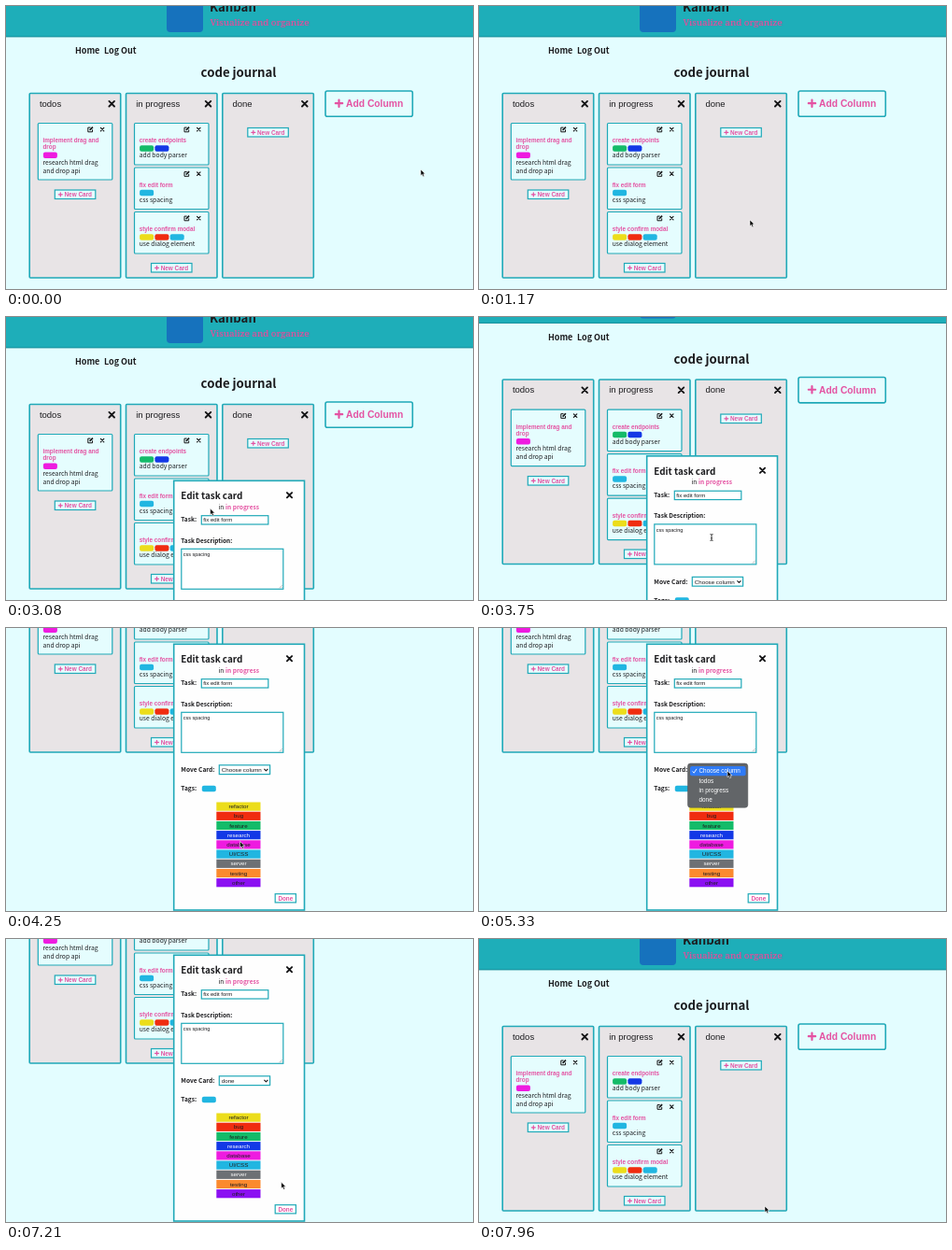
Recreate the animation shown at these times as an HTML page. Size 500 px wide and 303 px high, loop 8 s.

```html
<!DOCTYPE html>
<html lang="en">
<head>
<meta charset="utf-8">
<title>Kanban board</title>
<style>
  html, body { margin: 0; width: 100%; height: 100%; overflow: hidden; background: #e3fdff; }
  svg { display: block; width: 500px; height: 303px; }
  text { fill: #1c1c1f; white-space: pre; }
  .sans { font-family: "Noto Sans CJK JP", "Noto Sans CJK SC", "Noto Sans CJK", "Noto Sans", sans-serif; }
  .arial { font-family: "Liberation Sans", Arial, sans-serif; }
  .serif { font-family: "Noto Serif", serif; }
  .b { font-weight: 700; }
  .pink { fill: #e452a2; }
  .white { fill: #fff; }
  .mid { text-anchor: middle; }
</style>
</head>
<body>
<svg id="stage" viewBox="0 0 500 303" xmlns="http://www.w3.org/2000/svg"></svg>
<script>
const LOOP = 8000, MAX_SCROLL = 158;
const OPEN = 2700, POPUP = 4800, PICK = 6640, CLOSE = 7700;
const TEAL = '#20a9b8', ICE = '#e5fdfe', INK = '#141416', PINK = '#e452a2';
const TAG = {
  yellow: '#ecdd1b', red: '#f02c10', green: '#14bb69', blue: '#1338e6', magenta: '#ee1be0',
  cyan: '#21b6e1', gray: '#6d7074', orange: '#fb8a2e', purple: '#8b10f2'
};

// Drawing helpers
const text = (x, y, size, cls, str) =>
  `<text x="${x}" y="${y}" font-size="${size}" class="${cls}">${str}</text>`;
const rect = (x, y, w, h, fill, stroke = 'none', sw = 1, r = 0) =>
  `<rect x="${x}" y="${y}" width="${w}" height="${h}" rx="${r}" fill="${fill}" stroke="${stroke}" stroke-width="${sw}"/>`;
const line = (d, color, w, cap = 'butt') =>
  `<path d="${d}" fill="none" stroke="${color}" stroke-width="${w}" stroke-linecap="${cap}" stroke-linejoin="round"/>`;
const cross = (x, y, r, w) =>
  line(`M${x - r} ${y - r}l${2 * r} ${2 * r}M${x + r} ${y - r}l${-2 * r} ${2 * r}`, INK, w, 'round');
const plus = (x, y, r, w) =>
  line(`M${x - r} ${y}h${2 * r}M${x} ${y - r}v${2 * r}`, PINK, w, 'round');
const pill = (x, y, color) => rect(x, y, 15, 6.5, TAG[color], 'none', 0, 2);
const group = (id, body, attrs = '') => `<g id="${id}" ${attrs}>${body}</g>`;

const editIcon = (x, y) =>
  line(`M${x + .2} ${y - 2}h-2.7v4.7h4.7v-2.4`, INK, 1) +
  line(`M${x - .7} ${y + .9}L${x + 2.6} ${y - 2.4}`, INK, 1.7);

function newCard(x, y) {
  return rect(x, y, 43.5, 9.5, ICE, TEAL, 1.2) + plus(x + 6, y + 4.8, 2, 1.2) +
    text(x + 10.2, y + 7, 6.4, 'arial b pink', 'New Card');
}

function column(x, title) {
  return rect(x, 93.5, 97.5, 197.5, '#e8e4e6', TEAL, 1.6, 1) +
    text(x + 10.7, 107.5, 9.5, 'arial', title) + cross(x + 88, 104.7, 2.8, 1.9);
}

function card(x, y, h, title, tags, body) {
  let out = rect(x, y, 79.5, h, ICE, TEAL, 1.2, 1) +
    editIcon(x + 56, y + 6.6) + cross(x + 68.8, y + 6.6, 1.7, 1.2);
  title.forEach((s, i) => out += text(x + 5.2, y + 20.6 + i * 7.3, 6.3, 'arial b pink', s));
  const top = y + 23.7 + (title.length - 1) * 7.3;
  tags.forEach((c, i) => out += pill(x + 5.6 + i * 16.3, top, c));
  body.forEach((s, i) => out += text(x + 5.2, top + 13.2 + i * 9.1, 6.75, 'sans', s));
  return out;
}

function board() {
  return rect(0, -60, 500, 93, '#1eaeb9') + rect(0, 32.4, 500, 1, '#178f9b') +
    rect(172, -11, 39, 39, '#1672bd', 'none', 0, 4) +
    text(218, 6, 13.2, 'sans b', 'Kanban') +
    text(218.5, 20.5, 9.8, 'serif pink" style="text-shadow:.6px .6px 1px #7a6f98', 'Visualize and organize') +
    text(74, 51, 9, 'sans b', 'Home') + text(105, 51, 9, 'sans b', 'Log Out') +
    text(249, 76, 13.2, 'sans b mid', 'code journal') +
    column(25.2, 'todos') + column(128.5, 'in progress') + column(231.8, 'done') +
    card(34.3, 125.5, 60.5, ['implement drag and', 'drop'], ['magenta'], ['research html drag', 'and drop api']) +
    card(137.5, 125.5, 44.5, ['create endpoints'], ['green', 'blue'], ['add body parser']) +
    card(137.5, 173, 44.5, ['fix edit form'], ['cyan'], ['css spacing']) +
    card(137.5, 220.5, 44.5, ['style confirm modal'], ['yellow', 'red', 'cyan'], ['use dialog element']) +
    newCard(52.3, 197) + newCard(155.5, 275.5) + newCard(258.8, 130.5) +
    rect(342, 91, 93.3, 27.3, ICE, TEAL, 1.6, 2) + plus(356.5, 104.2, 3.7, 2.2) +
    text(364, 108, 10.3, 'arial b pink', 'Add Column');
}

function modal() {
  const tags = [['refactor', 'yellow'], ['bug', 'red'], ['feature', 'green'], ['research', 'blue'],
    ['database', 'magenta'], ['UI/CSS', 'cyan'], ['server', 'gray'], ['testing', 'orange'], ['other', 'purple']];
  return rect(179.7, 17.3, 139.8, 284.7, '#fefefe', TEAL, 1.6) +
    text(187.3, 37, 9.9, 'sans b', 'Edit task card') + cross(303.5, 32.7, 2.6, 1.9) +
    text(227.5, 47.8, 6.7, 'sans', 'in') + text(235, 47.8, 6.6, 'sans b pink', 'in progress') +
    text(187.3, 61.3, 6.5, 'sans b', 'Task:') + rect(209.3, 54.7, 71.5, 9.3, '#fff', TEAL, 1.2) +
    text(211.3, 61.4, 6, 'arial', 'fix edit form') +
    text(187.3, 83.5, 6.5, 'sans b', 'Task Description:') + rect(187.8, 90.3, 109, 43, '#fff', TEAL, 1.2) +
    text(189.7, 98, 5.5, 'arial', 'css spacing') + line('M292.5 132.3l3.3-3.3M294.4 132.3l1.4-1.4', '#888', .5) +
    text(187.3, 154.3, 6.6, 'sans b', 'Move Card:') + rect(228.3, 146.8, 54.3, 9.8, '#fff', TEAL, 1.2) +
    '<text id="choice" x="230.8" y="154" font-size="6.2" class="arial"></text>' +
    line('M276.4 150.8l2 2 2-2', INK, 1.1) +
    text(187.3, 174.2, 6.6, 'sans b', 'Tags:') + pill(209.8, 168.8, 'cyan') +
    tags.map(([name, color], i) => {
      const y = 186.5 + i * 10.2;
      const light = color === 'blue' || color === 'gray' ? ' white' : '';
      return rect(225.3, y, 47.2, 9.2, TAG[color]) + text(249, y + 6.7, 6.2, 'arial mid' + light, name);
    }).join('') +
    rect(288.2, 284.7, 22.2, 9.2, '#fff', TEAL, 1.2) + text(299.3, 291.6, 6.3, 'arial b pink mid', 'Done');
}

const ROW = 10.35;
function popup() {
  return rect(223.5, 145, 64.3, 47.3, '#626568', '#4c4f52', .5, 3) +
    '<rect id="mark" x="226" width="59.6" height="10.3" rx="2" fill="#2f7af5"/>' +
    line('M228.6 153.4l1.6 1.8 2.8-4.4', '#fff', .9) +
    ['Choose column', 'todos', 'in progress', 'done']
      .map((s, i) => text(235.5, 155.3 + i * ROW, 6.4, 'arial white', s)).join('');
}

// Pointers, hot spot at 0,0
const pointers = {
  arrow: '<path d="M0 0v6.7l1.5-1.4 1.1 2.5 1.3-.6-1.1-2.4h2.1z" fill="#000" stroke="#fff" stroke-width=".6"/>',
  hand: '<path d="M-.9 .5q.8-1 1.6 0v2.9l3 .7q.9.4.7 1.6l-.6 3h-4.2l-2.3-3.3q-.2-1.2 1-.7l.8.7z" fill="#fff" stroke="#000" stroke-width=".8"/>',
  beam: line('M-1.5-3.5q1.5 0 1.5 1v5q0 1-1.5 1M1.5-3.5q-1.5 0-1.5 1M1.5 3.5q-1.5 0-1.5-1M-.8 .8h1.6', '#111', .8)
};

document.getElementById('stage').innerHTML =
  rect(0, 0, 500, 303, '#e3fdff') +
  group('page', board() +
    group('hover', rect(0, 0, 10.8, 11.6, 'none', '#3b5558', .8)) +
    group('modal', modal(), `transform="translate(0 ${MAX_SCROLL})"`)) +
  group('popup', popup()) +
  group('cursor', Object.entries(pointers).map(([id, body]) => group(id, body)).join(''));

const el = id => document.getElementById(id);
const show = (id, on) => el(id).setAttribute('display', on ? 'inline' : 'none');
const move = (id, x, y) => el(id).setAttribute('transform', `translate(${x.toFixed(2)} ${y.toFixed(2)})`);
const ease = u => { u = Math.min(1, Math.max(0, u)); return u * u * (3 - 2 * u); };

// Pointer path: time, x, y
const path = [
  [80, 444, 175], [1120, 290, 229], [1260, 290, 229], [2080, 203.5, 182.5], [2300, 203.5, 182.5],
  [2500, 194, 180], [2760, 194, 180], [3450, 249, 236], [4160, 249, 236], [4650, 266, 153],
  [5450, 266, 153], [6200, 267, 181], [6720, 267, 181], [7450, 304, 287], [7660, 306, 286]
];

function pointerAt(t) {
  let a = path[0];
  for (const b of path) {
    if (t < b[0]) {
      const u = ease((t - a[0]) / (b[0] - a[0] || 1));
      return [a[1] + (b[1] - a[1]) * u, a[2] + (b[2] - a[2]) * u];
    }
    a = b;
  }
  return [a[1], a[2]];
}

const inside = (x, y, [l, t, w, h]) => x >= l && x <= l + w && y >= t && y <= t + h;
const iconBoxes = [[200.3, 173.8, 10.8, 11.6], [188.3, 173.8, 10.8, 11.6]];
const fieldBox = [188, 90 + MAX_SCROLL, 109, 43], doneBox = [288, 284 + MAX_SCROLL, 23, 10];

function draw(t) {
  const open = t >= OPEN && t < CLOSE, menu = t >= POPUP && t < PICK;
  const scroll = open ? MAX_SCROLL * ease((t - 3612) / 535) : 0;
  const [x, y] = pointerAt(t);
  const icon = !open && iconBoxes.find(b => inside(x, y, b));

  move('page', 0, -scroll);
  show('modal', open);
  show('popup', menu);
  show('hover', !!icon);
  if (icon) move('hover', icon[0], icon[1]);
  el('choice').textContent = t < PICK ? 'Choose column' : 'done';
  const row = Math.min(3, Math.max(0, Math.floor((y - 147.8) / ROW)));
  el('mark').setAttribute('y', 147.9 + row * ROW);

  let shape = 'arrow';
  if (icon || open && inside(x, y + scroll, doneBox)) shape = 'hand';
  else if (open && inside(x, y + scroll, fieldBox)) shape = 'beam';
  for (const id in pointers) show(id, id === shape);
  move('cursor', x, y);
}

const start = performance.now();
function tick() {
  draw((performance.now() - start) % LOOP);
  requestAnimationFrame(tick);
}
tick();
</script>
</body>
</html>
```
